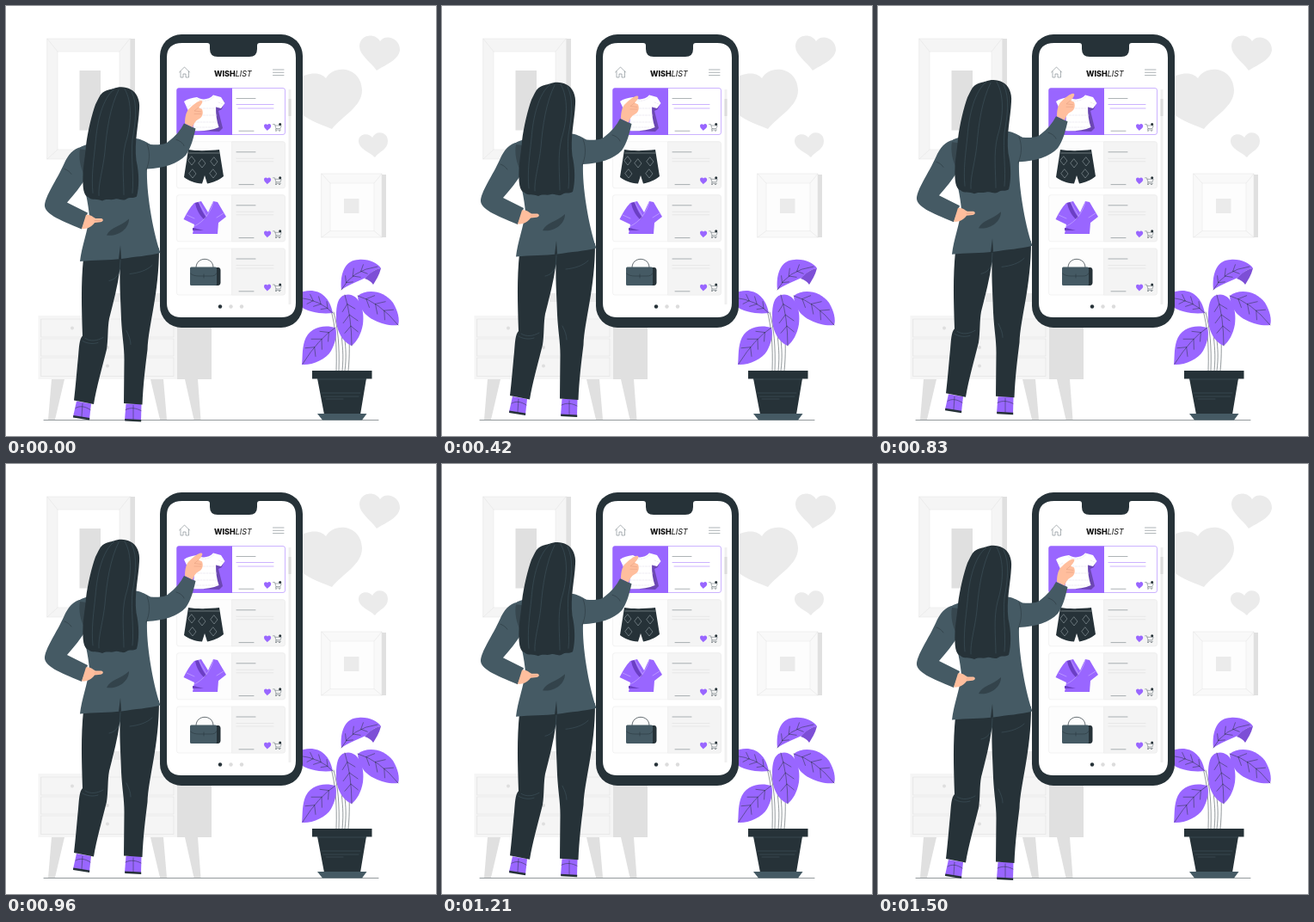
Animation, 500 px wide and 500 px high, one loop 1540 ms. Source, as an HTML page:

```html
<!DOCTYPE html>
<html lang="en">
<head>
<meta charset="utf-8">
<title>Wishlist</title>
<style>
  html, body { margin: 0; height: 100%; overflow: hidden; background: #fff; }
  svg { display: block; width: 100vw; height: 100vh; }
  .line { fill: none; stroke-width: .5; stroke-linecap: round; }
  .dark { fill: #263238; }
  .slate { fill: #455a64; }
  .violet { fill: #96f; }
  .skin { fill: #ffbe9d; }
  text { font: 9px Inter, Roboto, sans-serif; fill: #111; }
</style>
</head>
<body>
<svg viewBox="0 0 500 500">
  <defs>
    <g id="info">
      <path class="line" stroke="#5a666c" d="M268 12.500h22M271 50.300h17"/>
      <path class="violet" d="M303.800 50C302.500 48 300 47 300 44.500C300 41.800 303 41.500 304 43.300C305.300 41.200 308.200 42 308.200 44.500C308.200 47 305.500 48 303.800 50"/>
      <path class="line" stroke="#5a666c" d="M310.500 42.500h2l1.500 5h5l1.200-3.500h-7.200M314 47.500l-.5 1.500h6"/>
      <g class="dark"><circle cx="318.700" cy="42.500" r="1.500"/><circle cx="314" cy="50" r=".6"/><circle cx="318" cy="50" r=".6"/></g>
    </g>
    <g id="card">
      <rect x="198.500" y=".5" width="126" height="54" rx="2.500" fill="#fdfdfd" stroke="#ebebeb" stroke-width=".6"/>
      <path d="M262.500 .5h59.500q2.500 0 2.500 2.500v49q0 2.500-2.500 2.500h-59.500z" fill="#f4f4f4" stroke="#e8e8e8" stroke-width=".5"/>
      <path class="line" stroke="#d8d8d8" d="M268 20h43M268 23.500h43"/>
      <use href="#info"/>
    </g>
  </defs>

  <!-- wall -->
  <path fill="#f5f5f5" d="M48 38h97v140H48z"/>
  <path fill="#e0e0e0" d="M144.500 38h5.500v140h-5.500z"/>
  <path fill="#fff" stroke="#ebebeb" stroke-width=".7" d="M60 53h72v114H60z"/>
  <path class="line" stroke="#e0e0e0" d="M48 38h97v140H48zL60 53M144 38L132 53M48 178l12-11"/>
  <path fill="#e0e0e0" d="M85.500 75H110v69.500H85.500z"/>
  <path fill="#f9f9f9" d="M367 195h70v74h-70z"/>
  <path fill="#e0e0e0" d="M437 196h5v73h-5z"/>
  <path fill="#fdfdfd" stroke="#ebebeb" stroke-width=".6" d="M377 206h51v55.500h-51z"/>
  <path class="line" stroke="#e0e0e0" d="M367 195h70v74h-70zL377 206M437 195l-9 11M367 269l10-7.500M437 269l-9-7.500"/>
  <path fill="#ebebeb" d="M393 224h17.500v17H393z"/>
  <g fill="#ebebeb">
    <path d="M431 75C424 65 411 57 411 47C411 34 428 30 435 41C441 32 458 37 458 51C457 62 444 67 431 75"/>
    <path d="M379 143C360 135 334 128 332 103C332 80 362 72 372 84C380 68 413 69 414 98C414 117 392 127 379 143"/>
    <path d="M429 176C423 170 410 166 410 157C410 148 422 147 426 153C430 144 444 146 444 157C444 167 434 169 429 176"/>
  </g>

  <!-- cabinet -->
  <path fill="#e0e0e0" d="M53 434h15l-11 47h-8zM168 434h15l4 47h-8zM208 434h15l3.500 47h-8z"/>
  <path fill="#ebebeb" d="M125 334h55v10h-55z"/>
  <path fill="#f5f5f5" d="M119 344h64v16h-64z"/>
  <path fill="#f5f5f5" d="M37.500 360H199v74H37.500z"/>
  <path fill="#e0e0e0" d="M199 360h40v74h-40z"/>
  <path class="line" stroke="#dcdcdc" d="M41 364h154v21H41zM41 387h154v20H41zM41 409h154v21.500H41z"/>
  <g fill="#dedede"><circle cx="77" cy="374.500" r="2"/><circle cx="118" cy="397" r="2"/><circle cx="118" cy="418.500" r="2"/></g>
  <path class="line" stroke="#263238" d="M44 481.500h389"/>

  <!-- plant -->
  <path class="line" stroke="#263238" d="M384 424C385 395 383 372 378 354M387 424C388 396 386 374 381 356M391 424C393 405 391 395 390 380M394 424C396 408 395 398 394 388M398 424C400 405 399 390 399 380"/>
  <g class="violet">
    <path d="M380 357C370 358 352 358 339 347C338 338 341 333 346 332C362 328 376 336 380 357"/>
    <path d="M383 374C370 370 352 373 347 390C344 400 345 410 344 417C356 418 372 411 378 401C384 390 385 380 383 374"/>
    <path d="M409 337C420 328 440 331 450 345C456 355 458 365 456 371C440 373 420 364 414 353C411 347 409 342 409 337"/>
    <path d="M394 336C408 332 418 350 415 370C413 382 408 390 402 395C390 390 383 375 384 360C384 348 386 338 394 336"/>
    <path d="M390 330C388 310 395 295 410 295C422 294 432 299 436 305C428 306 424 311 418 316C408 321 396 325 390 330"/>
  </g>
  <path fill="#7d4fd6" d="M417 317C423 311 428 306 436 305C434 313 430 319 427 324C424 320 421 318 417 317"/>
  <g id="veins" class="line" stroke="#263238"></g>
  <path class="dark" d="M356 424h69.500v9.500H356zM362 433h57l-7 42h-42z"/>
  <path class="slate" d="M362 474h57.500l-5.500 7.500h-46z"/>
  <path class="line" stroke="#455a64" d="M362 434h57M367 450h45M369 454h41M372 457h20"/>

  <!-- phone -->
  <rect class="dark" x="179" y="33" width="166" height="341" rx="25"/>
  <path fill="#fff" d="M205 43h29q3 0 3 3v4q0 9 9 9h37q9 0 9-9v-4q0-3 3-3h25q17 0 17 17v285q0 17-17 17H204q-17 0-17-17V60q0-17 18-17"/>
  <path class="line" stroke="#5a666c" d="M201.500 77l6-6 6 6M203 76v7h3v-4h3v4h3.500v-7"/>
  <path class="line" stroke="#5a666c" d="M310.500 74H323M310.500 77.300H323M310.500 80.600H323"/>
  <text x="242" y="81.500"><tspan font-weight="800">WISH</tspan><tspan font-style="italic">LIST</tspan></text>
  <path fill="#f0f0f0" d="M328.500 97h3v250h-3z"/>
  <path fill="#dcdcdc" d="M328.500 108h3v20h-3z"/>
  <circle class="dark" cx="249" cy="349.500" r="2.200"/>
  <g fill="#dcdcdc"><circle cx="261.500" cy="349.500" r="2.200"/><circle cx="274" cy="349.500" r="2.200"/></g>

  <rect x="198.500" y="95.500" width="126" height="54" rx="2.500" fill="#fff" stroke="#96f" stroke-width=".5"/>
  <path class="violet" d="M263 95.500h-62q-2.500 0-2.500 2.500v49.500q0 2.500 2.500 2.500h62z"/>
  <path class="line" stroke="#96f" d="M268 114.500h43M270 119h41"/>
  <use href="#info" y="95"/>
  <use href="#card" y="157.300"/>
  <use href="#card" y="219.300"/>
  <use href="#card" y="281.500"/>

  <!-- goods -->
  <path fill="#6b47b3" d="M220 118l34-7-3 9-4 2 5 20-4 4-29-1z"/>
  <path fill="#fff" d="M222 106C228 110 236 109 241 103.500L250 106L254.500 113L250 119L244 117.500C244 126 245 134 247.500 141C239 145 227 146 217 145C219 136 219 128 218 119L212 122L207 111C211 108 216 107 222 106"/>
  <path class="line" stroke="#dcd8e6" d="M221 107.500C228 112 237 111 242 105M219 119h25M219 127h26M219 135h26M218 141h28M210 118l5-3M252 114l-5-2" stroke-dasharray="2 1.500"/>
  <path class="dark" d="M212 167C224 169 238 168 248 167L253 198C247 203 241 205 234 206.500L231 197L228 206.500C219 206 212 203 207 199z"/>
  <path class="line" stroke="#a9b4b9" d="M213 171h35M216 175l4 5-4 5-4-5zM228 178l4 5-4 5-4-5zM242 176l4 5-4 5-4-5zM217 190l4 5-4 5-4-5zM241 190l4 5-4 5-4-5z"/>
  <path class="violet" d="M219 229L227 227L235 240L241 227L246 228L256 245L247 252L246 265H217L219 254L206.500 248C210 241 214 234 219 229"/>
  <path fill="#6b3fc4" d="M220 229l4-1c2 7 5 13 9 18l-3 2c-5-5-9-12-10-19M217 258c4 0 7 2 13 3h-13z"/>
  <path class="line" stroke="#d6c2ff" d="M241 228C238 240 230 251 219 256M210 243l9 4M253 241l-8 5M224 228l9 16"/>
  <path class="line" stroke="#263238" d="M221 304C221 291 241 291 241 304" style="stroke-width:.7"/>
  <path class="dark" d="M243 304h4q2 0 2.500 3v15q-.5 3-3 3h-4z"/>
  <rect class="slate" x="214" y="303.500" width="31" height="21.500" rx="1.500"/>
  <path class="line" stroke="#263238" d="M214.500 311C218 314 222 314 226 314h12c4 0 6-1 6.500-3M230 312v4"/>

  <!-- shopper -->
  <g id="shopper">
    <path class="violet" d="M82 460l17 3-2 18-19-3z"/>
    <path class="violet" d="M139.500 463h18l-.5 20-19-1z"/>
    <path class="dark" d="M78.300 476.500l19 3-.3 2.500-19-3zM138.200 480.500l19 1v2.500l-19-1z"/>
    <path class="line" stroke="#263238" d="M81 468c5-3 11-2 17 2M89 463l-1 15M139 470c6-3 12-2 18 1M148 465v16"/>
    <path class="dark" d="M90 294C87 325 88 350 89 384C85 388 85 398 84 408C82 428 81 443 79 459L102 463.500C105 445 112 420 117 400C119 388 118 374 120 364C125 345 130 325 132.500 306C132 330 133.500 345 134 365C135 385 137.500 396 137.500 412L137 462.500L158.500 464C159.500 440 162 420 164.500 400C165.500 372 178 335 178 282z"/>
    <path class="line" stroke="#455a64" d="M92 387c6 4 14 3 21-1M89 390c5 3 12 4 18 2M140 378c3 6 5 11 5 16M133 296l-1 14c-3 6-7 9-12 10M170 302c-6 6-16 9-26 10"/>

    <path class="slate" d="M88 164.500C78 166 72 174 67.500 184C59 203 45 222 45 233C46 242 59 248 88 260L95 241L71 229C79 220 87 210 93 200L100 175z"/>
    <path class="slate" d="M86 165C98 158 140 153 154 155C161 157 165 160 168 161.500C177 162 185 162 189 158C197 152 203 145 207 137L220.500 143C218 154 215 166 209 174C200 184 183 189 164 190C163 215 170 260 179.500 287.500C166 291 150 292 134 294.500C120 296 102 296 86 297.500C88 280 95 262 97 246C96 230 91 210 87 194z"/>
    <path fill="#37474f" d="M86 167C84 178 87 189 91 197L94 168z"/>
    <path class="dark" d="M133 279l1 15.500-3 .5z"/>
    <path fill="#33434b" d="M117 267C122 257 132 258 143 248C143 260 130 269 117 267"/>
    <path class="line" stroke="#263238" d="M164 161C168 171 167 182 163 191M68 190c3 1 6 3 8 6M198 156c4 1 8 4 9 7"/>

    <path class="skin" d="M93 243.500C98 242.500 101 246 104 247.500L111 247.500C114 248.500 113 251.500 110 251.700L103 252.500C100 257 95 260 88 259.500z"/>
    <path class="line" stroke="#d98f72" d="M103 250h7"/>
    <path class="skin" d="M208 137C208 128 210 122 214 119C218 115 223 111 227 110.500C229.500 111 228.500 114 224 118.500L228 120.500C230 126 228 130 224 132C220 134 218 138 217 141.500z"/>
    <path class="line" stroke="#e09a7c" d="M224 118.500l-5 4 8 1M219 126h8"/>

    <path class="dark" d="M112 101.500C117 97.500 122 97.500 125 96.500C131 94 139 94 145 97.500C152 101 156 110 155 120C154 140 149 158 151.500 180C155 195 155 211 152 222C148 225 143 222 140 225C135 228 132 224 127 225C121 227 118 224 112 227C106 224 100 227 96 223C90 221 89 212 89.500 196C90 185 92 176 93 163C95 146 100 126 104 115C107 109 109 104 112 101.500"/>
    <path class="line" stroke="#455a64" d="M126 97C112 108 106 135 104 160C102 180 99 198 101 218M131 98C121 118 117 145 115 170C113 190 107 208 108 221M138 97C147 112 146 138 139 160C134 180 137 202 137 220M146 100C154 116 150 138 147 156C145 176 149 199 147 218"/>
  </g>
</svg>
<script>
  const svgPath = d => {
    const p = document.createElementNS("http://www.w3.org/2000/svg", "path");
    p.setAttribute("d", d);
    return p;
  };

  // Midrib along a quadratic curve with pairs of slanted side veins.
  function veins(x0, y0, cx, cy, x1, y1, reach) {
    let d = `M${x0} ${y0}Q${cx} ${cy} ${x1} ${y1}`;
    for (let u = 0.2; u < 0.85; u += 0.22) {
      const v = 1 - u;
      const x = v * v * x0 + 2 * u * v * cx + u * u * x1;
      const y = v * v * y0 + 2 * u * v * cy + u * u * y1;
      const angle = Math.atan2(v * (cy - y0) + u * (y1 - cy), v * (cx - x0) + u * (x1 - cx));
      const length = reach * Math.sin(Math.PI * (0.2 + 0.7 * u));
      for (const side of [-0.8, 0.8])
        d += `M${x} ${y}l${length * Math.cos(angle + side)} ${length * Math.sin(angle + side)}`;
    }
    document.getElementById("veins").append(svgPath(d));
  }
  veins(380, 357, 366, 342, 340, 339, 9);
  veins(383, 374, 364, 386, 345, 416, 12);
  veins(409, 337, 434, 344, 456, 371, 12);
  veins(394, 336, 402, 362, 402, 395, 12);
  veins(390, 330, 402, 307, 432, 303, 9);

  const LOOP = 1540, LEAD = 40, RISE = 10;
  const shopper = document.getElementById("shopper");
  const start = performance.now();

  function draw(now) {
    const elapsed = Math.max(0, now - start);
    const phase = ((elapsed + LEAD) % LOOP) / LOOP;
    const lift = RISE * (1 - Math.abs(1 - 2 * phase));
    shopper.setAttribute("transform", `translate(0 ${-lift})`);
    requestAnimationFrame(draw);
  }
  draw(start);
</script>
</body>
</html>
```
